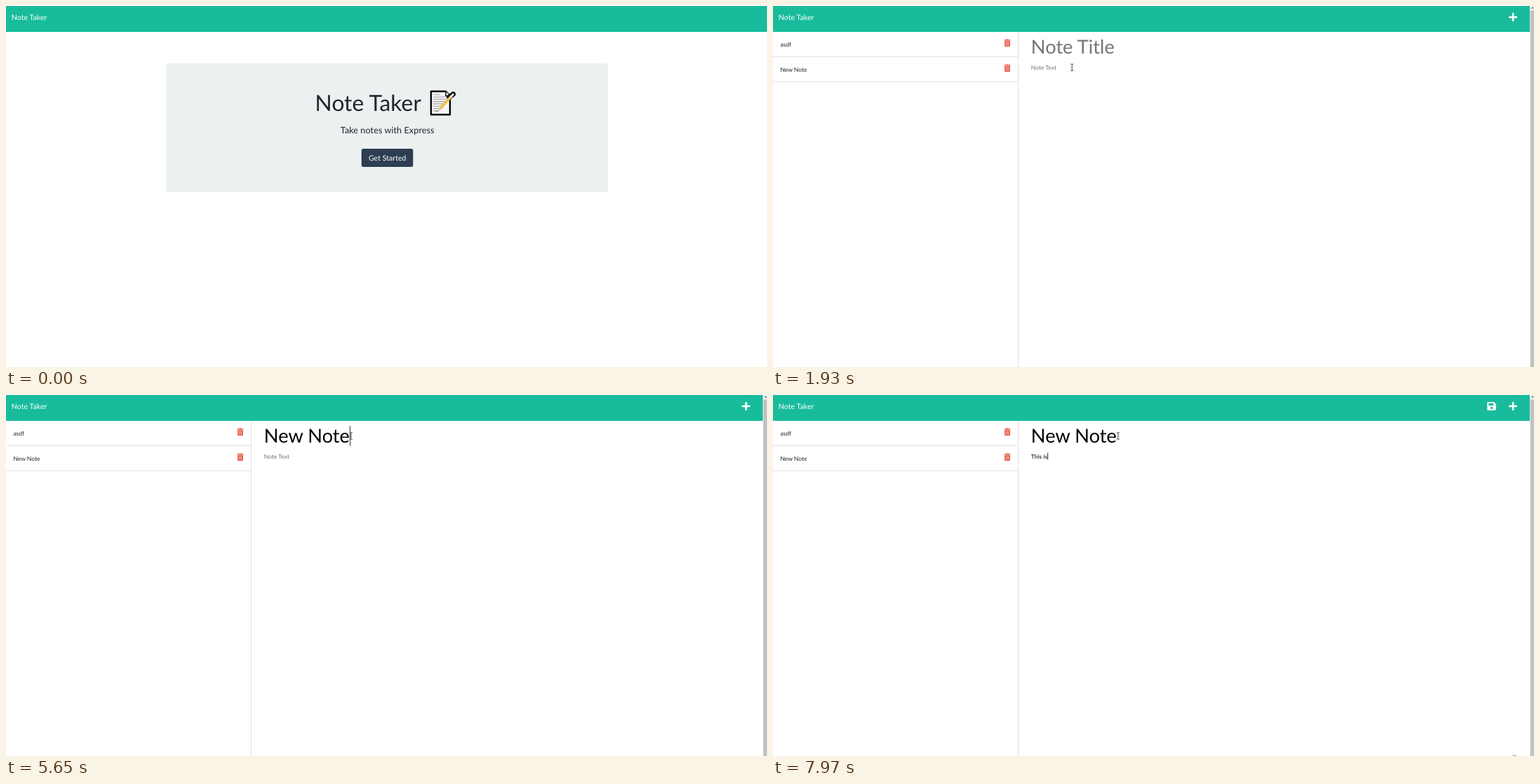
An HTML page for the animation above (8000 ms loop, 1085 px wide and 516 px high).

```html
<!DOCTYPE html>
<html lang="en">
<head>
<meta charset="utf-8">
<title>Note Taker</title>
<style>
  html, body { margin: 0; width: 100%; height: 100%; overflow: hidden; background: #fff; }
  svg { display: block; width: 1085px; height: 516px; }
  text { font-family: Lato, sans-serif; white-space: pre; text-rendering: geometricPrecision; fill: #212529; }
  .brand { font-size: 10.64px; fill: #fff; }
  .small { font-size: 8.51px; }
  .title { font-size: 27.25px; }
  .mid { text-anchor: middle; }
  .rule { fill: #dfdfdf; }
</style>
</head>
<body>
<svg viewBox="0 0 1085 516" xmlns="http://www.w3.org/2000/svg">
  <defs>
    <g id="trash">
      <path fill="#e74c3c" d="M.3.7H2.8L3.3 0H5.7L6.2.7H8.7Q9 .7 9 1V1.9H0V1Q0 .7.3.7ZM.6 2.6H8.4V9.5Q8.4 10.5 7.4 10.5H1.6Q.6 10.5.6 9.5Z"/>
      <path stroke="#fff" stroke-width=".65" stroke-linecap="round" d="M2.6 4.2V9M4.5 4.2V9M6.4 4.2V9"/>
    </g>
  </defs>

  <rect width="1085" height="516" fill="#fff"/>
  <rect id="nav" width="1085" height="37" fill="#18bc9c"/>
  <text class="brand" x="7.8" y="20.2">Note Taker</text>

  <g id="home">
    <rect x="228.7" y="82" width="629.8" height="184" rx="2.7" fill="#ecf0f1"/>
    <text x="440.6" y="149.6" font-size="31.8">Note Taker</text>
    <g id="memo" stroke-linejoin="round" stroke-linecap="round" fill="none">
      <path d="M606 122H627L633 128.5V155.3H606Z" fill="#f4f4f4" stroke="#000" stroke-width="2.4"/>
      <path d="M627 122V128.5H633" fill="#fff" stroke="#000" stroke-width="1.4"/>
      <path d="M609.5 126.7H619M609.5 130H628M609.5 133.3H628M609.5 136.6H626M609.5 139.9H623M609.5 143.2H620M609.5 146.5H617M609.5 149.8H614" stroke="#a3a3a3" stroke-width="1.1"/>
      <path d="M632 130.5L637.5 126" stroke="#000" stroke-width="7"/>
      <path d="M619.5 146L635 129" stroke="#f3c04b" stroke-width="4" stroke-linecap="butt"/>
      <path d="M634.4 129.7L637.4 126.4" stroke="#d9dde0" stroke-width="3.2"/>
      <path d="M618 144.7L621 147.3L615.8 150.3Z" fill="#e9b98c"/>
      <path d="M612.5 151.3Q615 148.5 616.5 150" stroke="#444" stroke-width=".8"/>
    </g>
    <text class="mid" x="543.7" y="182.4" font-size="12.77">Take notes with Express</text>
    <rect id="ring" x="505.1" y="202.2" width="77" height="29.5" rx="4.2" fill="#4c5b6a" fill-opacity=".5"/>
    <rect id="button" x="506.8" y="203.9" width="73.6" height="26.1" rx="2.7"/>
    <text class="brand mid" x="543.7" y="220.6">Get Started</text>
  </g>

  <g id="app">
    <rect class="rule" x="349.3" y="37" width="1" height="479"/>
    <g id="list">
      <text class="small" x="10.4" y="57.7">asdf</text>
      <text class="small" x="10.4" y="93.5">New Note</text>
      <use href="#trash" x="329.6" y="47.6"/>
      <use href="#trash" x="329.6" y="83.4"/>
      <rect class="rule" y="71.8" width="349.5" height="1"/>
      <rect class="rule" y="107.8" width="349.5" height="1"/>
    </g>
    <text id="title" class="title" x="367.8" y="68.3"></text>
    <text id="body" class="small" x="367.8" y="90.7"></text>
    <rect id="caret" width=".8" fill="#000"/>
    <path stroke="#fff" stroke-width="2.7" stroke-linecap="round" d="M1055.1 11.2V20.8M1050.3 16H1059.9"/>
    <g id="save">
      <path fill="#fff" d="M1019.6 10H1027.8L1030.9 13.1V20.8Q1030.9 22.1 1029.6 22.1H1019.6Q1018.3 22.1 1018.3 20.8V11.3Q1018.3 10 1019.6 10Z"/>
      <rect x="1020.2" y="11.8" width="7" height="3.2" rx=".3" fill="#18bc9c"/>
      <circle cx="1024.6" cy="18.4" r="1.75" fill="#18bc9c"/>
    </g>
    <circle id="bump" cx="1057" r="8" fill="#999"/>
    <rect x="1079" width="6" height="516" fill="#f1f1f1"/>
    <rect x="1079.8" y="6.5" width="5.2" height="510" fill="#c1c1c1"/>
    <path d="M1080.9 3.6L1083 1.2L1085 3.6Z" fill="#606060"/>
  </g>

  <path id="arrow" d="M0 0V9.4L2.2 7.4L3.7 10.9L5.2 10.2L3.8 6.9H6.7Z" fill="#fff" stroke="#000" stroke-width=".6"/>
  <path id="beam" d="M-2-4.7H-.5L0-4.3L.5-4.7H2M0-4.3V4.3M-2 4.7H-.5L0 4.3L.5 4.7H2" fill="none" stroke="#333" stroke-width=".9"/>
</svg>
<script>
const LOOP = 8000, TICK = 1000 / 15;
const el = {};
document.querySelectorAll('[id]').forEach(e => el[e.id] = e);

// pointer keys: time, x, y
const arrowPath = [[0, 1056, 522], [70, 1048, 508], [400, 800, 350], [730, 563, 222], [800, 559, 216.5]];
const beamPath = [[1333, 560, 217], [1600, 510, 165], [1930, 426, 88], [2200, 450, 71], [2333, 450, 59],
  [2733, 450, 59], [2933, 504, 59], [3066, 492, 58.5]];

// moments at which each character lands
const titleKeys = [4520, 4720, 4850, 4980, 5250, 5350, 5450, 5650];
const bodyKeys = [6980, 7170, 7310, 7440, 7570, 7700, 7840];

const show = (e, on) => e.setAttribute('visibility', on ? 'visible' : 'hidden');
const typed = (str, keys, t) => str.slice(0, keys.filter(k => k <= t).length);

function along(path, t) {
  const last = path[path.length - 1];
  if (t <= path[0][0]) return path[0].slice(1);
  if (t >= last[0]) return last.slice(1);
  const i = path.findIndex(p => p[0] > t);
  const [t0, x0, y0] = path[i - 1], [t1, x1, y1] = path[i];
  const k = (t - t0) / (t1 - t0);
  return [x0 + (x1 - x0) * k, y0 + (y1 - y0) * k];
}

function place(e, path, t) {
  e.setAttribute('transform', `translate(${along(path, t)})`);
}

function setText(e, str, hint) {
  const value = str || hint;
  if (e.textContent !== value) e.textContent = value;
  e.style.fill = str ? '#000' : '#757575';
}

function caretOn(t) {
  if (t < 3130) return false;
  if (t < 4520) return t < 3660 || t >= 4190;
  return t < 6580 || t >= 6980;
}

function drawCaret(t, title, body) {
  const inBody = t >= 6040;
  const field = inBody ? el.body : el.title;
  const width = (inBody ? body : title) ? field.getComputedTextLength() : 0;
  el.caret.setAttribute('x', 368.1 + width);
  el.caret.setAttribute('y', inBody ? 82.3 : 44.2);
  el.caret.setAttribute('height', inBody ? 10.3 : 28.5);
  show(el.caret, caretOn(t));
}

function draw(t) {
  const inApp = t >= 1000;
  const step = Math.floor((t + 7) / TICK) * TICK;
  el.home.style.display = inApp ? 'none' : '';
  el.app.style.display = inApp ? '' : 'none';
  el.nav.setAttribute('width', inApp ? 1079 : 1085);
  show(el.arrow, t >= 70 && !inApp);
  show(el.beam, inApp);

  if (!inApp) {
    place(el.arrow, arrowPath, step);
    el.button.setAttribute('fill', t >= 730 ? '#1e2b37' : '#2c3e50');
    show(el.ring, t >= 860);
    return;
  }
  place(el.beam, beamPath, step);
  const title = typed('New Note', titleKeys, t);
  const body = typed('This is', bodyKeys, t);
  setText(el.title, title, 'Note Title');
  setText(el.body, body, 'Note Text');
  drawCaret(t, title, body);
  show(el.list, t >= 1070);
  show(el.save, t >= 7050);
  show(el.bump, t >= 6380);
  el.bump.setAttribute('cy', t < 7840 ? 522.6 : 523);
}

const start = performance.now();
function loop() {
  draw((performance.now() - start) % LOOP);
  requestAnimationFrame(loop);
}
loop();
</script>
</body>
</html>
```
